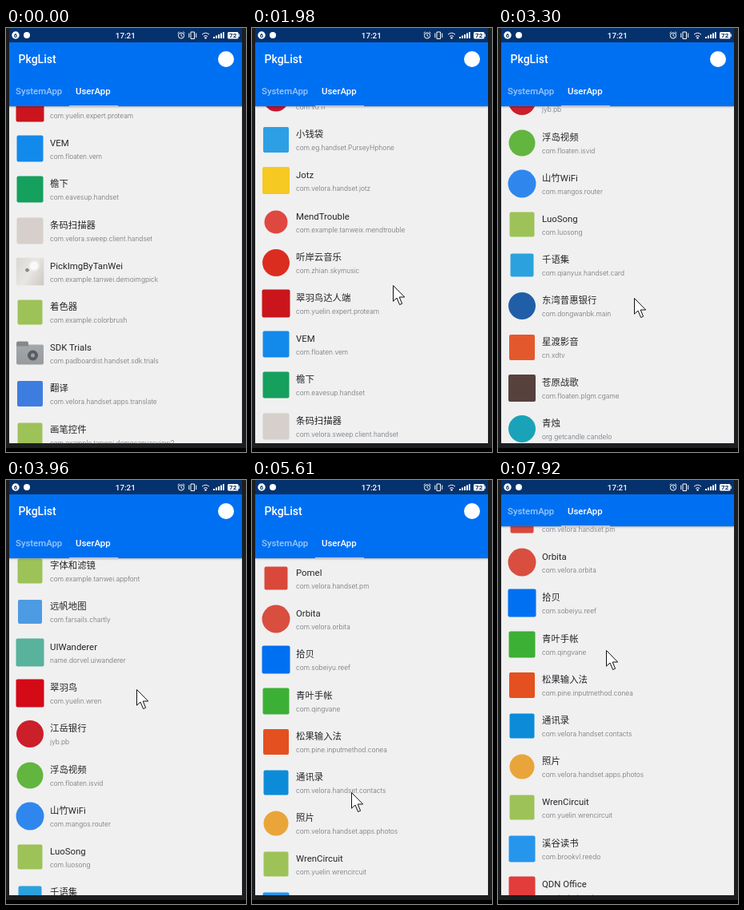
An HTML page for the animation above (8000 ms loop, 300 px wide and 531 px high).

```html
<!DOCTYPE html>
<html lang="zh-CN">
<head>
<meta charset="utf-8">
<title>PkgList</title>
<style>
html, body { margin: 0; width: 100%; height: 100%; overflow: hidden; background: #1c1e20; }
body { position: relative; font-family: Roboto, "Noto Sans CJK SC", "Noto Sans CJK", sans-serif; }
#stage { position: absolute; left: 0; top: 0; width: 300px; height: 531px; overflow: hidden; background: linear-gradient(#1c1e20 526px, #000 526px); }
#screen { position: absolute; left: 4px; top: 0; width: 291px; height: 520px; overflow: hidden; background: #f0f0f0; }
#status { position: absolute; left: 0; top: 0; width: 291px; height: 18px; background: #05326c; }
#header { position: absolute; left: 0; top: 18px; width: 291px; height: 80px; background: #0070f2; box-shadow: 0 1px 2px rgba(0, 0, 0, .3); }
#header span { position: absolute; line-height: 20px; font-weight: 500; font-size: 11.4px; color: #fff; white-space: nowrap; }
#header .title { left: 11.5px; top: 11px; font-size: 14px; }
#header .tab { top: 51px; }
#header .idle { left: 8px; color: rgba(255, 255, 255, .6); }
#header .active { left: 83px; }
#header i { position: absolute; left: 75px; bottom: 0; width: 61px; height: 1px; background: #b9d8ff; }
#header b { position: absolute; left: 261px; top: 10.5px; width: 20px; height: 20px; border-radius: 50%; background: #fff; }
#list { position: absolute; left: 0; top: 0; }
.row { position: absolute; left: 0; width: 291px; height: 51px; white-space: nowrap; }
.row p { position: absolute; left: 51px; margin: 0; line-height: 16px; }
.name { top: 0; font-size: 11.4px; color: #26262b; }
.pkg { top: 16.5px; font-family: Inter, sans-serif; font-size: 8.4px; font-weight: 300; color: #6c6f75; }
.icon { position: absolute; left: 26px; top: 15px; transform: translate(-50%, -50%); border-radius: 2px; }
.icon.round { border-radius: 50%; }
.photo { background: radial-gradient(circle at 40% 45%, #8f8a84 0 7%, transparent 9%), radial-gradient(circle at 65% 30%, #fafafa 0 12%, transparent 22%), linear-gradient(120deg, #d9d7d3, #e9e7e4 50%, #cbc6c0); }
.icon.folder { width: 34px; height: 25px; top: 17px; background: linear-gradient(#a5a7aa, #989b9e); }
.folder::before { content: ""; position: absolute; left: 0; top: -4px; width: 15px; height: 6px; background: #85888b; border-radius: 2px 2px 0 0; }
.folder::after { content: ""; position: absolute; left: 14px; top: 7px; width: 5px; height: 5px; border: 4px solid #595d61; border-radius: 50%; }
svg { position: absolute; left: 0; top: 0; overflow: visible; }
</style>
</head>
<body>
<div id="stage">
  <div id="screen">
    <div id="list"></div>
    <div id="header">
      <span class="title">PkgList</span><b></b>
      <span class="tab idle">SystemApp</span><span class="tab active">UserApp</span><i></i>
    </div>
    <div id="status"></div>
  </div>
  <svg width="300" height="20" fill="none" stroke="#fff" font-family="Roboto, sans-serif" text-anchor="middle">
    <g fill="#fff" stroke="none">
      <circle cx="12" cy="9" r="4.7"/><circle cx="26" cy="9" r="4"/>
      <text x="149.3" y="12.6" font-size="9.8" font-weight="500">17:21</text>
      <rect x="277" y="5" width="13.5" height="8.5" rx="1.5"/><rect x="290.5" y="7.5" width="1.3" height="3.5"/>
      <path d="M259 13v-2h2v2zM262 13v-3.5h2V13zM265 13V8h2v5zM268 13V6.5h2V13zM271 13V5h1.7v8z"/>
      <circle cx="249.5" cy="12.4" r="1.2"/>
    </g>
    <g fill="#05326c" stroke="none" font-weight="700">
      <text x="12" y="11.7" font-size="7.5">6</text>
      <text x="283.7" y="12.2" font-size="8">72</text>
    </g>
    <circle cx="219" cy="9.5" r="3.6"/><path d="M219 7.3v2.4l1.5 1M214.6 6.6l2-1.9M223.4 6.6l-2-1.9"/>
    <path d="M231 5h4.5v8.5H231zM228.8 6.5v5.5M237.7 6.5v5.5"/>
    <path d="M245 8.2q4.5-4 9 0M247 10.5q2.5-2 5 0"/>
  </svg>
  <svg id="cursor" width="16" height="26"><path d="M.5.5V20.2L5 16l3.6 8.5 3-1.3L8.2 15h6.5Z" fill="#fff" stroke="#111"/></svg>
</div>
<script>
const PITCH = 51.2, FIRST_Y = 116, STEP = 330, LOOP = 8000, TOOLBAR = 40;
const GREEN = 's#9dc257 31';

// name | package | shape (s square, c circle) with colour and size
const apps = `Pomel|com.velora.handset.pm|s#d9483b 29
Orbita|com.velora.orbita|c#d94e3f 35
拾贝|com.sobeiyu.reef|s#0070f2 35
青叶手帐|com.qingvane|s#3cb034 33
松果输入法|com.pine.inputmethod.conea|s#e4501f 32
通讯录|com.velora.handset.contacts|s#0c8cd8 31
照片|com.velora.handset.apps.photos|c#e9a53a 31
WrenCircuit|com.yuelin.wrencircuit|${GREEN}
溪谷读书|com.brookvl.reedo|s#2695ec 33
QDN Office|cn.qdn.deskwork_eng|s#e23c3b 33
ulu共享单车|so.ulu.wheels|s#33290f 29
知岸公开课|com.zhian.lecture|s#466b58 31
标签查看|com.qrv.biaoqia|s#bd8c49 33
字体和滤镜|com.example.tanwei.appfont|${GREEN}
远帆地图|com.farsails.chartly|s#4d9be2 30
UIWanderer|name.dorvel.uiwanderer|s#58b29c 35
翠羽鸟|com.yuelin.wren|s#d40a17 35
江岳银行|jyb.pb|c#cb1f2a 34
浮岛视频|com.floaten.isvid|c#62b53f 33
山竹WiFi|com.mangos.router|c#2f87ee 35
LuoSong|com.luosong|${GREEN}
千语集|com.qianyux.handset.card|s#2ba2dd 29
东湾普惠银行|com.dongwanbk.main|c#215ea8 34
星渡影音|cn.xdtv|s#e3592c 32
苍原战歌|com.floaten.plgm.cgame|s#57413d 34
青烛|org.getcandle.candelo|c#1aa3b8 34
锚锚|com.maomaox.handset.anket|c#1b7bd0 34
夜读集锦|com.xyz.tanweix.yeduriji|s#4c70b4 28
潮信银行|com.tidebk.handset.phone|s#1d91a5 33
风隼|com.kestrl.windfalcons|c#62749a 33
RR|com.vo.rr|c#c5152e 31
小钱袋|com.eg.handset.PurseyHphone|s#2d9fe4 32
Jotz|com.velora.handset.jotz|s#f6c822 34
MendTrouble|com.example.tanweix.mendtrouble|c#df4840 29
听岸云音乐|com.zhian.skymusic|c#dc2c20 34
翠羽鸟达人端|com.yuelin.expert.proteam|s#cb151c 35
VEM|com.floaten.vem|s#128aec 33
檐下|com.eavesup.handset|s#15a05e 33
条码扫描器|com.velora.sweep.client.handset|s#d6cfcb 33
PickImgByTanWei|com.example.tanwei.demoimgpick|photo
着色器|com.example.colorbrush|${GREEN}
SDK Trials|com.padboardist.handset.sdk.trials|folder
翻译|com.velora.handset.apps.translate|s#3d7de0 32
画笔控件|com.example.tanwei.democanvasview2|${GREEN}`.split('\n').map(line => line.split('|'));

// scroll, pointer x, pointer y; one entry per step
const still = [1815];
const steps = [
  still, still, still, still,
  [1802, 176, 242], [1690, 176, 316], [1570, 176, 322], [1448, 175, 226],
  [1352, 174, 242], [1120, 172, 316], [901, 170, 338], [770, 167, 330],
  [675, 163, 262], [590, 159, 250], [496, 157, 291], [220, 142, 360],
  [0, 126, 391], [0, 124, 391], [0, 124, 391], [0, 124, 391], [0, 130, 290],
  [12, 133, 272], [29, 134, 255], [52, 135, 232], [71, 135, 213]
];

const $ = id => document.getElementById(id);
const add = (parent, tag, className, text = '') => {
  const el = document.createElement(tag);
  el.className = className;
  el.textContent = text;
  parent.append(el);
  return el;
};

function makeIcon(row, spec) {
  const icon = add(row, 'div', 'icon');
  const [paint, size = '35'] = spec.split(' ');
  if (paint === 'folder') {
    icon.classList.add(paint);
    return;
  }
  icon.style.width = icon.style.height = size + 'px';
  if (paint === 'photo') {
    icon.classList.add(paint);
  } else {
    icon.style.background = paint.slice(1);
    icon.classList.toggle('round', paint[0] === 'c');
  }
}

apps.forEach(([name, pkg, spec], i) => {
  const row = add($('list'), 'div', 'row');
  row.style.top = Math.round(FIRST_Y - 8 + i * PITCH) + 'px';
  makeIcon(row, spec);
  add(row, 'p', 'name', name);
  add(row, 'p', 'pkg', pkg);
});

function draw() {
  const index = Math.floor(performance.now() % LOOP / STEP);
  const [scroll, x, y] = steps[Math.min(index, steps.length - 1)];
  $('list').style.transform = `translateY(${-scroll}px)`;
  // the toolbar collapses with the first pixels of upward scrolling
  const hidden = index > 20 ? Math.min(scroll, TOOLBAR) : 0;
  $('header').style.transform = `translateY(${-hidden}px)`;
  $('cursor').style.display = x === undefined ? 'none' : '';
  if (x !== undefined) $('cursor').style.transform = `translate(${x}px, ${y}px)`;
  requestAnimationFrame(draw);
}
draw();
</script>
</body>
</html>
```
